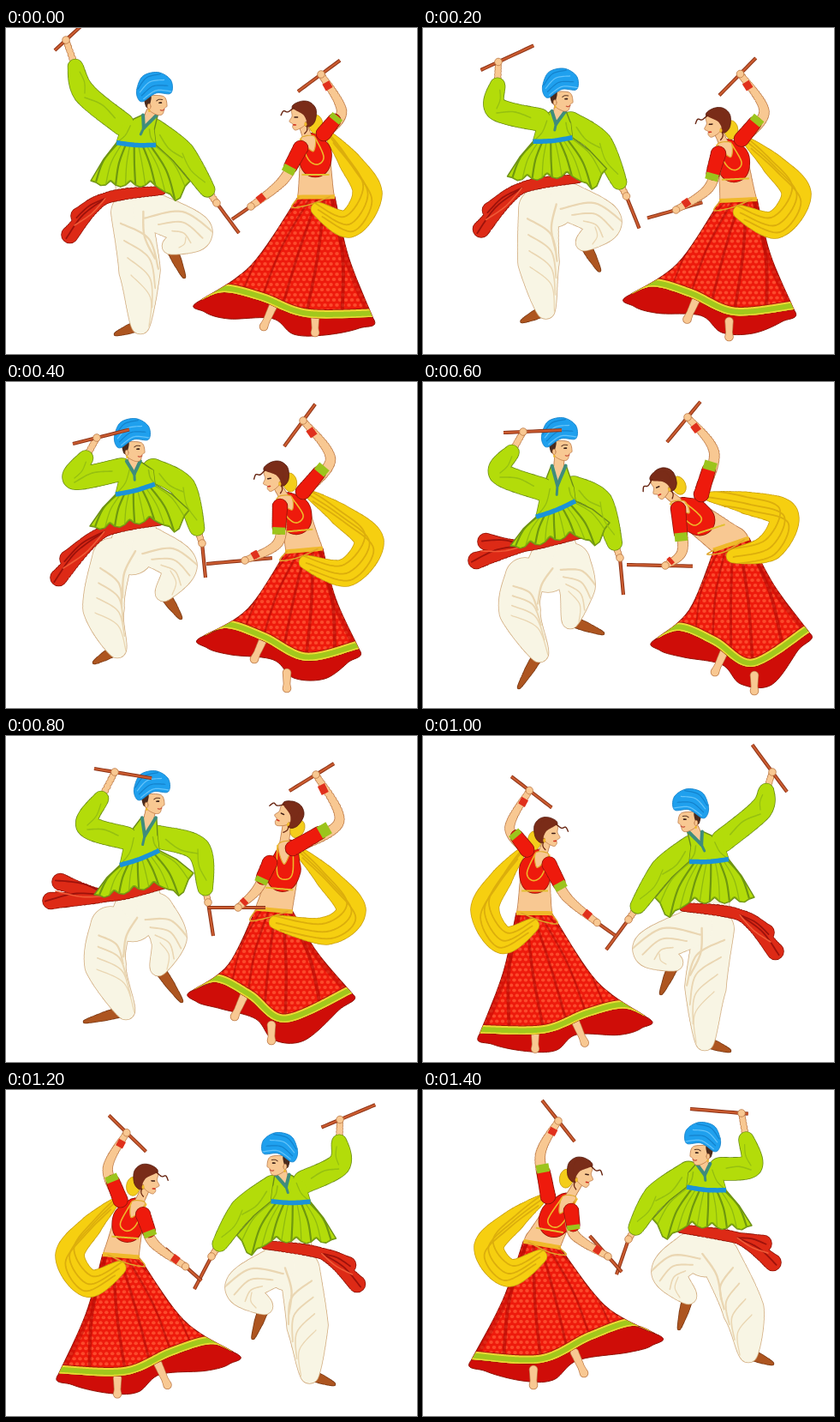
An HTML page with a canvas for the animation above (1600 ms loop, 480x380 px).

```html
<!DOCTYPE html>
<html lang="en">
<head>
<meta charset="utf-8">
<title>Stick dance</title>
<style>
html, body { margin: 0; width: 100%; height: 100%; overflow: hidden; background: #fff; }
canvas { display: block; }
</style>
</head>
<body>
<canvas id="stage" width="480" height="380"></canvas>
<script>
const ctx = document.getElementById('stage').getContext('2d');
const STEP = 200;
const SKIN = '#f8c892', SKIN_LINE = '#bd7a48';
const GREEN = '#b3dc0a', GREEN_DARK = '#7fa80e', GREEN_LINE = '#6b8d18';
const CREAM = '#f8f5e4', CREAM_DARK = '#ead6b2', CREAM_LINE = '#d2ad80';
const RED = '#ee1a0c', RED_DARK = '#c00a06', RED_LINE = '#8f1408';
const GOLD = '#efb92a';

// ---- poses: only joints and cloth tips; all outlines follow from them.
// place = [x scale, x shift, y shift]; the man's waist carries its slope.
const HERE = [1, 0, 0];
const man1 = {
  place: HERE, head: [174, 89], waist: [152, 135, .06], tail: [80, 230],
  elbowUp: [92, 76], handUp: [70, 14], tipUp: [57, 26],
  elbowLow: [206, 146], handLow: [246, 204], tipLow: [272, 239],
  kneeA: [156, 282], ankleA: [157, 346], toeA: [128, 357],
  kneeB: [220, 238], ankleB: [192, 254], toeB: [208, 290]
};
const man2 = {
  place: HERE, head: [148, 80], waist: [151, 125, -.26], tail: [67, 217],
  elbowUp: [80, 112], handUp: [106, 65], tipUp: [78, 72],
  elbowLow: [207, 123], handLow: [229, 188], tipLow: [233, 228],
  kneeA: [114, 263], ankleA: [130, 311], toeA: [103, 327],
  kneeB: [202, 214], ankleB: [184, 246], toeB: [204, 275]
};
const man3 = {
  place: HERE, head: [160, 79], waist: [155, 148, -.4], tail: [68, 197],
  elbowUp: [90, 106], handUp: [117, 58], tipUp: [94, 59],
  elbowLow: [207, 140], handLow: [230, 205], tipLow: [234, 248],
  kneeA: [113, 266], ankleA: [136, 316], toeA: [112, 356],
  kneeB: [180, 238], ankleB: [172, 278], toeB: [210, 293]
};
const man4 = {
  place: HERE, head: [171, 78], waist: [156, 142, -.37], tail: [58, 181],
  elbowUp: [95, 104], handUp: [127, 42], tipUp: [103, 38],
  elbowLow: [224, 132], handLow: [236, 194], tipLow: [242, 233],
  kneeA: [116, 266], ankleA: [140, 320], toeA: [92, 333],
  kneeB: [190, 235], ankleB: [178, 270], toeB: [205, 309]
};
const man5 = { ...man1, place: [-1, 486, 10], handUp: [78, 32], tipUp: [61, 55] };
const man6 = {
  place: [-1, 486, 0], head: [160, 75], waist: [155, 115, -.08], tail: [83, 190],
  elbowUp: [103, 88], handUp: [114, 27], tipUp: [174, 22],
  elbowLow: [214, 124], handLow: [246, 174], tipLow: [260, 215],
  kneeA: [112, 256], ankleA: [106, 307], toeA: [78, 319],
  kneeB: [198, 212], ankleB: [176, 240], toeB: [187, 278]
};

const woman1 = {
  place: HERE, face: [342, 106], chest: [361, 147], waist: [362, 197],
  elbowUp: [392, 97], handUp: [368, 54], tipUp: [341, 74],
  elbowLow: [324, 177], handLow: [286, 208], tipLow: [264, 223],
  scarfSide: [422, 193], scarfLow: [400, 228],
  hemL: [228, 317], hemLow: [350, 337], hemR: [428, 337],
  toeA: [301, 348], toeB: [361, 355]
};
const woman2 = {
  place: HERE, face: [311, 114], chest: [337, 152], waist: [348, 196],
  elbowUp: [379, 90], handUp: [347, 45], tipUp: [325, 75],
  elbowLow: [318, 187], handLow: [279, 208], tipLow: [234, 212],
  scarfSide: [424, 186], scarfLow: [397, 222],
  hemL: [231, 296], hemLow: [350, 325], hemR: [412, 311],
  toeA: [290, 323], toeB: [328, 357]
};
const woman3 = {
  place: HERE, face: [278, 123], chest: [315, 155], waist: [360, 189],
  elbowUp: [340, 82], handUp: [309, 41], tipUp: [285, 70],
  elbowLow: [303, 196], handLow: [283, 214], tipLow: [238, 213],
  scarfSide: [421, 155], scarfLow: [405, 192],
  hemL: [273, 299], hemLow: [385, 332], hemR: [451, 292],
  toeA: [341, 338], toeB: [387, 360]
};
const woman4 = {
  place: HERE, face: [325, 94], chest: [325, 155], waist: [313, 203],
  elbowUp: [389, 100], handUp: [362, 45], tipUp: [331, 64],
  elbowLow: [294, 178], handLow: [271, 200], tipLow: [236, 200],
  scarfSide: [403, 203], scarfLow: [374, 227],
  hemL: [219, 296], hemLow: [326, 334], hemR: [404, 300],
  toeA: [267, 327], toeB: [310, 355]
};
const woman5 = { ...woman1, place: [-.963, 478.7, 9.5] };
const woman6 = {
  ...woman2, place: [-1, 500, -12], face: [312, 112], chest: [344, 160], waist: [361, 192],
  elbowUp: [363, 88], handUp: [342, 48], tipUp: [323, 72],
  elbowLow: [323, 181], handLow: [284, 206], tipLow: [268, 224],
  scarfSide: [423, 195], scarfLow: [400, 225],
  hemL: [229, 296], hemLow: [362, 330], hemR: [443, 326],
  toeA: [312, 342], toeB: [371, 356]
};

const mix = (a, b, t) => a.map((v, i) => v + ((b[i] ?? 0) - v) * t);
const add = (p, dx, dy) => [p[0] + dx, p[1] + dy];
function between(a, b, dx = 0, dy = 0) {
  const out = {};
  for (const k in a) out[k] = mix(a[k], b[k], .5);
  out.place[1] += dx;
  out.place[2] += dy;
  return out;
}

const beats = [
  [man1, woman1],
  [between(man1, man2), between(woman1, woman2, 13, 4)],
  [man2, woman2],
  [man3, woman3],
  [man4, woman4],
  [man5, woman5],
  [between(man5, man6), between(woman5, woman6)],
  [man6, woman6]
];

// ---- drawing helpers
function smooth(p, closed = false, n = 10) {
  const len = p.length, out = [];
  const at = i => closed ? p[(i + len) % len] : p[Math.max(0, Math.min(len - 1, i))];
  for (let i = 0; i < (closed ? len : len - 1); i++) {
    for (let j = 0; j < n; j++) {
      const t = j / n;
      out.push([0, 1].map(k => {
        const [a, b, c, d] = [-1, 0, 1, 2].map(s => at(i + s)[k]);
        return b + .5 * t * (c - a + t * (2 * a - 5 * b + 4 * c - d + t * (3 * b - a - 3 * c + d)));
      }));
    }
  }
  if (!closed) out.push(p[len - 1]);
  return out;
}
function poly(p, closed = true) {
  const path = new Path2D();
  p.forEach(q => path.lineTo(q[0], q[1]));
  if (closed) path.closePath();
  return path;
}
function paint(path, fill, edge, w = 1) {
  ctx.fillStyle = fill;
  ctx.fill(path);
  if (edge) { ctx.strokeStyle = edge; ctx.lineWidth = w; ctx.stroke(path); }
}
const blob = (p, fill, edge, w) => paint(poly(smooth(p, true)), fill, edge, w);
function line(p, color, w = 1, cap = 'round') {
  ctx.lineCap = cap;
  ctx.lineJoin = 'round';
  ctx.strokeStyle = color;
  ctx.lineWidth = w;
  ctx.stroke(poly(smooth(p), false));
}
// soft tube along joints, with a width at each joint
function tube(joints, widths, grow = 0) {
  const path = new Path2D(), n = 16;
  smooth(joints, false, n).forEach((q, i) => {
    const k = Math.min(Math.floor(i / n), widths.length - 2);
    const r = (widths[k] + (widths[k + 1] - widths[k]) * (i / n - k)) / 2 + grow;
    path.moveTo(q[0] + r, q[1]);
    path.arc(q[0], q[1], r, 0, 7);
  });
  return path;
}
// several tubes joined under one outline
function tubes(list, fill, edge) {
  for (const [j, w] of list) paint(tube(j, w, .8), edge);
  for (const [j, w] of list) paint(tube(j, w), fill);
}
const limb = (joints, widths) => tubes([[joints, widths]], SKIN, SKIN_LINE);
function oval(x, y, rx, ry, fill, edge) {
  const path = new Path2D();
  path.ellipse(x, y, rx, ry, 0, 0, 7);
  paint(path, fill, edge, .8);
}
function clipped(path, draw) {
  ctx.save();
  ctx.clip(path);
  draw();
  ctx.restore();
}
function turned([x, y], angle, draw) {
  ctx.save();
  ctx.translate(x, y);
  ctx.rotate(angle);
  draw();
  ctx.restore();
}
function fold(a, b, bow, color, w) {
  line([a, add(mix(a, b, .5), (a[1] - b[1]) * bow, (b[0] - a[0]) * bow), b], color, w);
}
// point on the way from a to b, a set length past b
function beyond(a, b, extra) {
  const d = Math.hypot(b[0] - a[0], b[1] - a[1]);
  return mix(a, b, 1 + extra / d);
}
function stick(a, b) {
  line([a, b], '#8e3518', 4.2, 'butt');
  line([a, b], '#cc5c30', 2.2, 'butt');
}
const stickOf = (tip, hand, len) => stick(tip, beyond(tip, hand, len - Math.hypot(hand[0] - tip[0], hand[1] - tip[1])));
const fist = p => oval(p[0], p[1], 4.3, 4.3, SKIN, SKIN_LINE);

// ---- man
function manHead(at) {
  turned(at, -.05, () => {
    blob([[-11, -9], [10, -9], [14, 2], [11, 5], [8, 12], [1, 12], [-8, 5]], SKIN, SKIN_LINE, .8);
    blob([[-12, -11], [-4, -10], [-7, 2], [-11, 2]], '#4a2a1c');
    oval(-7, 2, 2, 3.2, SKIN, SKIN_LINE);
    oval(-7, 7, 1.2, 1.6, GOLD);
    line([[2, -4], [5, -5.5], [9, -5]], '#5a3522', 1);
    line([[5, -1.5], [7.5, -1.5]], '#3a2018', 1.7);
    line([[6, 7], [8, 7.6], [10.5, 6.5]], '#c8503a', 1.2);
    blob([[-20, -20], [-12, -34], [6, -37], [20, -27], [19, -12], [2, -13], [-14, -4], [-20, -9]], '#1fa0ee', '#1583cc', .9);
    for (let i = 0; i < 4; i++) {
      fold([-19 + i * 2, -19 + i * 4], [8 + i * 4, -35 + i * 7], -.17, i % 2 ? '#66c4fa' : '#1482cc', 1.2);
    }
  });
}

function drawMan(m) {
  const slope = m.waist[2];
  const from = (dx, dy, tilt = 0) => add(m.waist, dx, dy + tilt * slope);
  const hipA = from(-10 + 65 * slope, 80), hipB = from(18, 76, 35);
  const shoulderA = from(-16, -23), shoulderB = from(21, -17, 20);
  const beltL = from(-23, 0, -23), beltR = from(23, 0, 23);
  const neck = mix(m.head, m.waist, .27);

  // shoes and trousers
  for (const [ankle, toe] of [[m.ankleA, m.toeA], [m.ankleB, m.toeB]]) {
    tubes([[[beyond(toe, ankle, 2), mix(ankle, toe, .5), toe], [13, 10, 3]]], '#ad5520', '#7a3812');
  }
  const legA = [hipA, m.kneeA, m.ankleA], legB = [hipB, m.kneeB, m.ankleB];
  tubes([
    [[from(0, 46), mix(hipA, hipB, .5)], [48, 52]],
    [legA, [46, 48, 21]],
    [legB, [44, 42, 19]]
  ], CREAM, CREAM_LINE);
  for (const [path, [hip, knee, ankle]] of [[tube(legA, [46, 48, 21]), legA], [tube(legB, [44, 42, 19]), legB]]) {
    clipped(path, () => {
      for (let i = 0; i < 4; i++) {
        const low = mix(ankle, knee, i * .35), high = mix(knee, hip, i * .3);
        fold(add(low, 10 + i * 4, 2), add(high, -10 - i, 6), .2, CREAM_DARK, 1.3 + i * .3);
      }
    });
  }
  fold(mix(hipA, hipB, .6), mix(hipA, m.kneeA, .8).map((v, i) => v + (i ? 0 : 20)), .1, CREAM_DARK, 2.4);

  // sash: a band and two loose ends
  const knot = from(-36, 61, 45);
  const ends = [-11, 11].map(d => [[from(30, 51, 55), knot, add(m.tail, -d * .5, d)], [9, 12, 19]]);
  tubes(ends, '#dd2a16', RED_LINE);
  for (const [j] of ends) fold(j[1], mix(j[1], j[2], 1.1), .08, '#9d120b', 1.8);
  fold(knot, m.tail, -.06, '#f05a36', 1.6);

  // kurta with a scalloped hem
  const hemL = from(-53, 43), hemR = from(63, 40, 60);
  const hem = [];
  for (let t = 0; t <= 1.001; t += .05) {
    const dip = 7 * Math.abs(Math.sin(t * Math.PI * 5)) + 18 * Math.exp(-(((t - .84) / .1) ** 2));
    hem.push(add(mix(hemR, hemL, 1 - t), 0, dip * Math.min(1, t * 8, (1 - t) * 12)));
  }
  const flare = (belt, tip) => add(mix(belt, tip, .5), 0, -3);
  const cuffUp = mix(m.elbowUp, m.handUp, .5), cuffLow = mix(m.elbowLow, m.handLow, .73);
  const kurta = poly([shoulderA, add(neck, -9, 0), add(neck, 9, 1), shoulderB, beltR, flare(beltR, hemR),
    ...hem.slice().reverse(), flare(beltL, hemL), beltL]);
  const sleeveUp = [[shoulderA, m.elbowUp, cuffUp], [26, 26, 17]];
  const sleeveLow = [[shoulderB, m.elbowLow, cuffLow], [26, 28, 17]];

  limb([m.elbowUp, m.handUp], [9, 6]);
  limb([m.elbowLow, m.handLow], [9, 6]);
  tubes([sleeveLow], GREEN, GREEN_LINE);
  paint(kurta, GREEN, GREEN_LINE, 1.4);
  tubes([sleeveUp], GREEN, GREEN_LINE);
  paint(poly([shoulderA, neck, shoulderB, beltR, beltL]), GREEN);
  clipped(kurta, () => {
    for (let i = 1; i < 20; i += 2) {
      fold(mix(beltL, beltR, i / 20), hem[i], (10 - i) * .01, i % 4 === 1 ? '#6f980f' : '#8fba10', i % 4 === 1 ? 2.2 : 1.3);
    }
    line(hem, GREEN_DARK, 2);
    fold(beltL, mix(shoulderA, shoulderB, .25), .1, '#93bd10', 1.3);
    fold(beltR, mix(shoulderA, shoulderB, .85), -.1, '#93bd10', 1.6);
  });
  for (const [[a, b, c], w] of [sleeveUp, sleeveLow]) {
    clipped(tube([a, b, c], w), () => {
      fold(mix(a, b, .2), add(b, 0, 5), .1, '#96c010', 1.6);
      fold(b, add(mix(b, c, .8), 3, 0), .1, '#96c010', 1.3);
    });
  }
  line([beltL, add(m.waist, 0, 1.5).slice(0, 2), beltR], '#1b93d8', 5.5, 'butt');

  // neck and collar
  const vee = mix(neck, m.waist, .45);
  limb([m.head, neck], [11, 11]);
  paint(poly([add(neck, -7, 0), add(neck, 7, 1), vee]), SKIN);
  for (const side of [-8, 8]) line([add(neck, side, 0), vee], '#3f8c7c', 4);
  line([vee, mix(vee, m.waist, .4)], '#3f8c7c', 3);
  manHead(m.head);

  stickOf(m.tipUp, m.handUp, 68);
  fist(m.handUp);
  stick(m.handLow, m.tipLow);
  fist(m.handLow);
}

// ---- woman
function arm(shoulder, elbow, hand) {
  const end = mix(shoulder, elbow, .58), trim = mix(shoulder, elbow, .78);
  limb([shoulder, elbow, hand], [13, 11, 6]);
  tubes([[[shoulder, end], [17, 15]]], RED, RED_LINE);
  line([end, trim], '#9cc41c', 15, 'butt');
  line([mix(elbow, hand, .6), mix(elbow, hand, .78)], '#e0301c', 9, 'butt');
  fist(hand);
}

function womanHead(at, angle) {
  turned(at, angle, () => {
    oval(20, 6, 8, 11, '#f4cd1a', '#c99c10');
    blob([[-8, -12], [0, -20], [12, -20], [20, -11], [18, 4], [8, 8]], '#7a2c18', '#54190c', .8);
    blob([[-8, -11], [3, -13], [9, -3], [7, 7], [-3, 13], [-7, 10], [-7, 6], [-11, 3], [-8, -3]], SKIN, SKIN_LINE, .8);
    blob([[-8, -13], [2, -18], [13, -13], [11, 4], [5, -5]], '#7a2c18');
    line([[-6, -13], [-13, -8], [-18, -9], [-21, -4]], '#66230f', 1.4);
    line([[8, 4], [10, 12], [7, 17]], '#66230f', 1.3);
    line([[-5, -2], [-1.5, -2]], '#3c1c14', 1.5);
    line([[-6, 7], [-3.5, 7]], '#d0301f', 1.6);
    oval(8, 6, 1.6, 2.5, GOLD);
  });
}

function drawWoman(w) {
  const { face, chest, waist, hemL, hemLow, hemR } = w;
  const lean = Math.atan2(waist[0] - chest[0], waist[1] - chest[1]) * -.35;
  const belt = d => add(waist, d * Math.cos(lean), d * Math.sin(lean));
  const shoulderUp = add(chest, 10, -24), shoulderLow = add(chest, -17, -7);
  const neck = mix(face, chest, .5);

  // inside of the skirt, then the legs in front of it
  blob([hemL, add(hemL, 4, 14), add(hemL, 32, 22), add(mix(hemL, hemLow, .68), 0, 8),
    add(hemLow, -14, 20), add(hemLow, 22, 21), add(mix(hemLow, hemR, .8), 0, 13), hemR,
    mix(waist, hemLow, .5)], '#cf0d08', RED_LINE);
  for (const [toe, dx, dy] of [[w.toeA, 11, -24], [w.toeB, 0, -18]]) {
    limb([add(toe, dx, dy), add(toe, dx * .3, dy * .3), toe], [9, 7, 9]);
  }

  limb([chest, waist], [33, 42]);

  // skirt
  const crest = add(hemL, 27, -9);
  const hem = smooth([hemL, crest, add(mix(crest, hemLow, .45), 0, -3), hemLow, hemR]);
  const left = smooth([belt(-21), add(mix(belt(-21), hemL, .55), 8, 13), hemL]);
  const right = smooth([hemR, add(mix(belt(22), hemR, .5), -6, 0), belt(22)]);
  const skirt = poly([...left, ...hem, ...right]);
  paint(skirt, RED, RED_LINE, 1.2);
  clipped(skirt, () => {
    for (let r = -4; r < 27; r++) {
      for (let c = -20; c < 20; c++) {
        oval(waist[0] + c * 7 + (r & 1) * 3.5, waist[1] + r * 6, 2.3, 1.9, '#fb4a2c');
      }
    }
    for (let i = 1; i < 6; i++) {
      fold(belt(i * 8 - 22), hem[10 + i * 5], .1 - i * .03, 'rgba(170, 8, 4, .55)', 1.5 + i * .5);
    }
    line(right, 'rgba(190, 10, 5, .5)', 12);
    line(hem, '#a8140a', 21);
    line(hem, '#f0d834', 19);
    line(hem, '#a2c81c', 15);
    line(hem, '#f0d834', 3);
  });

  // gold belt with a loose chain
  line([belt(-22), belt(22)], GOLD, 5, 'butt');
  line([belt(-20), add(waist, -28, 12), add(waist, -8, 9), belt(16)], '#dfa62a', 1.5);

  // scarf
  const drape = [add(shoulderUp, 6, 2), add(mix(shoulderUp, w.scarfSide, .5), 5, -2), w.scarfSide, w.scarfLow, add(waist, 2, 14)];
  const girth = [8, 25, 34, 32, 15];
  tubes([[drape, girth]], '#f6cf10', '#c99f10');
  clipped(tube(drape, girth), () => {
    for (const d of [-8, 1, 9]) line(drape.map(p => add(p, d * .6, d)), '#dcae0c', 1.8);
  });

  // blouse
  tubes([[[add(neck, 5, 6), chest, mix(chest, waist, .18)], [19, 38, 35]]], RED, RED_LINE);
  limb([add(face, 4, 4), neck], [9, 10]);
  blob([add(neck, -7, 2), add(neck, 9, 0), add(mix(neck, chest, .75), 0, 2)], SKIN, '#e0aa30', 1.2);
  line([add(neck, -8, 3), add(chest, -8, 6), add(chest, 3, 12), add(chest, 10, 3), add(neck, 10, 2)], GOLD, 1.6);
  line([-16, 0, 16].map(d => add(mix(chest, waist, .48), d, d * lean)), '#e2c030', 2, 'butt');
  womanHead(face, .45 - Math.atan2(chest[0] - face[0], chest[1] - face[1]));

  stickOf(w.tipUp, w.handUp, 61);
  arm(shoulderUp, w.elbowUp, w.handUp);
  stick(w.tipLow, beyond(w.tipLow, w.handLow, 32));
  arm(shoulderLow, w.elbowLow, w.handLow);
}

function draw(figure, pose) {
  const [sx, dx, dy] = pose.place;
  ctx.save();
  ctx.translate(dx, dy);
  ctx.scale(sx, 1);
  figure(pose);
  ctx.restore();
}

let shown = -1;
function tick() {
  const i = Math.floor(performance.now() / STEP) % beats.length;
  if (i !== shown) {
    shown = i;
    ctx.fillStyle = '#fff';
    ctx.fillRect(0, 0, 480, 380);
    draw(drawMan, beats[i][0]);
    draw(drawWoman, beats[i][1]);
  }
  requestAnimationFrame(tick);
}
tick();
</script>
</body>
</html>
```
